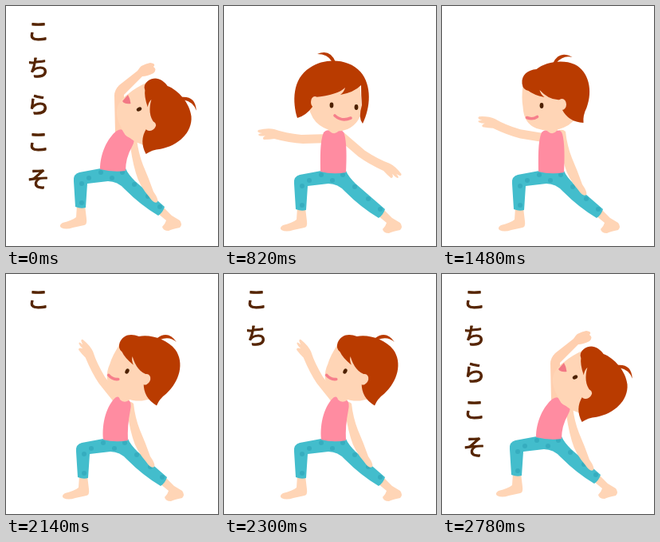
Recreate the animation shown at these times as an HTML page. Size 266 by 300 pixels, loop 2.94 s.

```html
<!DOCTYPE html>
<html lang="ja">
<head>
<meta charset="utf-8">
<style>
  html, body { margin: 0; width: 100%; height: 100%; overflow: hidden; background: #fff; }
  svg { display: block; width: 100%; height: 100%; }
  text {
    font: 500 28.5px "Noto Sans CJK JP", "Noto Sans CJK", sans-serif;
    text-anchor: middle; fill: #552400; stroke: #552400; stroke-width: 1.1; stroke-linejoin: round;
  }
  .skin { fill: #ffd5b6; }
  .hair { fill: #b93b00; }
  .top { fill: #ff8ca1; }
  .eye { fill: #4d2100; }
  .line { fill: none; stroke-linecap: round; stroke-linejoin: round; }
</style>
</head>
<body>
<svg viewBox="0 0 266 300">
  <defs>
    <g id="legs">
      <path class="skin" d="M92 252L91 267Q86 271 74 274Q69 277 72 280Q78 283 87 280L101 277Q105 276 104 269L102 252Z"/>
      <path class="skin" d="M193 262L204 271Q203 275 199 279Q200 284 207 284Q211 282 221 280Q225 276 221 271L211 265L200 254Z"/>
      <path fill="#43bdcc" d="M122 206L153 206Q156 213 165 222L202 254Q200 261 194 265Q172 252 152 232Q143 222 131 222L105 225L103 255Q97 257 90 254L88 222Q87 213 95 211Z"/>
      <g id="dots" fill="#36adbf"></g>
    </g>
    <!-- shoulder at the origin, hand towards the left -->
    <path id="arm" class="skin" d="M5 -5L-30 -4Q-50 -6 -64 -11Q-72 -13 -84 -10Q-87 -7 -79 -6Q-86 -5 -83 -3Q-79 -2 -75 -3Q-80 0 -77 2Q-70 2 -64 1Q-45 6 -28 7L5 6Z"/>
    <path id="low" class="skin" d="M-4 -4Q1 -7 5 -3Q7 15 13 30Q20 46 26 63Q33 73 31 76Q27 79 21 70Q8 55 4 40Q-2 20 -4 -4Z"/>
    <g id="head">
      <path class="skin" d="M100 98Q98 115 100 126Q101 147 117 153Q138 160 157 149L168 140L166 110L140 85Z"/>
      <path class="hair" d="M99 97C98 86 106 80 117 79C128 70 150 66 165 73C183 82 188 106 180 127Q175 137 176 146Q157 145 149 129L148 117Q134 119 121 105Q122 110 127 114Q113 111 107 106Q100 105 99 97Z"/>
      <ellipse class="skin" cx="149" cy="123" rx="5.5" ry="7"/>
      <path class="hair" d="M138 71Q146 55 162 64Q151 61 142 71Z"/>
      <ellipse class="eye" cx="123.5" cy="124.5" rx="2.4" ry="3.4"/>
    </g>
    <path id="smile" class="line" stroke="#f67f8b" stroke-width="3.6" d="M105 139.5Q112 142.5 118 138.5"/>
    <g id="front">
      <path class="skin" d="M108 110L106 126Q110 142 120 149Q137 161 155 154Q172 146 173 126L170 95L130 92Z"/>
      <path class="hair" d="M92 140C86 121 85 91 108 77C127 64 157 66 171 82C186 99 184 127 174 147Q168 140 173 124Q172 112 172 99Q163 108 146 111Q151 107 152 102Q143 111 114 114L111 126Q103 137 92 140Z"/>
      <ellipse class="skin" cx="114" cy="120" rx="5" ry="7"/>
      <path class="hair" d="M117 60Q133 53 140 70L135 69Q130 60 117 60Z"/>
      <ellipse class="eye" cx="135" cy="124" rx="2.4" ry="3.4"/>
      <ellipse class="eye" cx="166" cy="126.5" rx="2.4" ry="3.4"/>
      <path class="line" stroke="#f67f8b" stroke-width="3.6" d="M139 137Q148 145 159 140"/>
    </g>
  </defs>
  <g id="poses"></g>
  <g id="words"></g>
</svg>
<script>
const LOOP = 2940, STARTS = [0, 160, 820, 1480, 1980, 2460];
const WORD_START = 2140, WORD_STEP = 160;
const el = id => document.getElementById(id);

const use = (id, x = 0, y = 0, turn = 0, flip = 1) =>
  `<use href="#${id}" transform="translate(${x} ${y}) rotate(${turn}) scale(${flip} 1)"/>`;
const neck = (x1, y1, x2, y2) =>
  `<path class="line" stroke="#ffd5b6" stroke-width="14" d="M${x1} ${y1}L${x2} ${y2}"/>`;
const shirt = d => `<path class="top" d="${d}"/>`;
// Places the profile head with its eye at (x, y).
const head = (x, y, turn, smile = true) =>
  `<g transform="translate(${x} ${y}) rotate(${turn}) translate(-123.5 -124.5)">
    <use href="#head"/>${smile ? '<use href="#smile"/>' : ''}</g>`;

const upright = neck(138, 150, 138, 160) +
  shirt('M121 207C121 190 120 170 125 158Q130 153 133 157Q139 162 144 156Q149 154 151 160C154 170 154 190 153 208Q137 211 121 207Z');
const leanBack = neck(147, 148, 148, 160) +
  shirt('M122 207C120 187 126 164 138 154Q142 152 143 157Q148 162 154 158Q158 160 156 170Q152 190 153 208Q137 211 122 207Z');
const archBack = neck(152, 146, 153, 160) +
  shirt('M118 204C118 185 127 165 139 156Q146 152 147 157Q151 165 158 165Q163 167 158 176Q150 190 150 206Q134 208 118 204Z');

const arch = use('legs', -3, -3) +
  '<path fill="#ffcfaf" d="M137 158L136 112Q136 105 142 99L165 81Q169 73 181 71Q189 72 185 76Q190 79 185 84Q177 88 171 88L148 111L148 158Z"/>' +
  use('low', 159, 169) + archBack + head(167, 129, 59, false) +
  '<path fill="#f27885" d="M146 119L153 111Q156 116 156.500 122Q149 123 146 119Z"/>';

const poses = [
  arch,
  use('legs') + use('arm', 127, 165) + use('arm', 151, 165, 0, -1) + upright + head(123.5, 124.5, 0),
  use('legs') + use('arm', 127, 165) + use('arm', 151, 165, 39, -1) + upright + use('front'),
  use('legs') + use('arm', 127, 164, 11) + use('low', 150, 160) + upright + head(125, 124.5, 0),
  use('legs') + use('arm', 139, 155, 53) + use('low', 155, 165) + leanBack + head(152, 121.5, 27),
  arch
];

const dots = [[98, 225], [107, 218], [122, 211], [136, 218], [149, 211], [98, 249],
  [164, 226], [181, 241], [196, 254]];
el('dots').innerHTML = dots.map(([x, y]) => `<circle cx="${x}" cy="${y}" r="3"/>`).join('');
el('poses').innerHTML = poses.map(p => `<g>${p}</g>`).join('');
el('words').innerHTML = [...'こちらこそ']
  .map((c, i) => `<text x="40.500" y="${41.5 + 46.3 * i}">${c}</text>`).join('');

const show = (node, on) => node.setAttribute('visibility', on ? 'visible' : 'hidden');

function draw() {
  const t = performance.now() % LOOP;
  const now = STARTS.findLastIndex(s => t >= s);
  const count = t < STARTS[1] ? 5 : Math.floor((t - WORD_START) / WORD_STEP) + 1;
  [...el('poses').children].forEach((p, i) => show(p, i === now));
  [...el('words').children].forEach((w, i) => show(w, i < count));
  requestAnimationFrame(draw);
}
draw();
</script>
</body>
</html>
```
